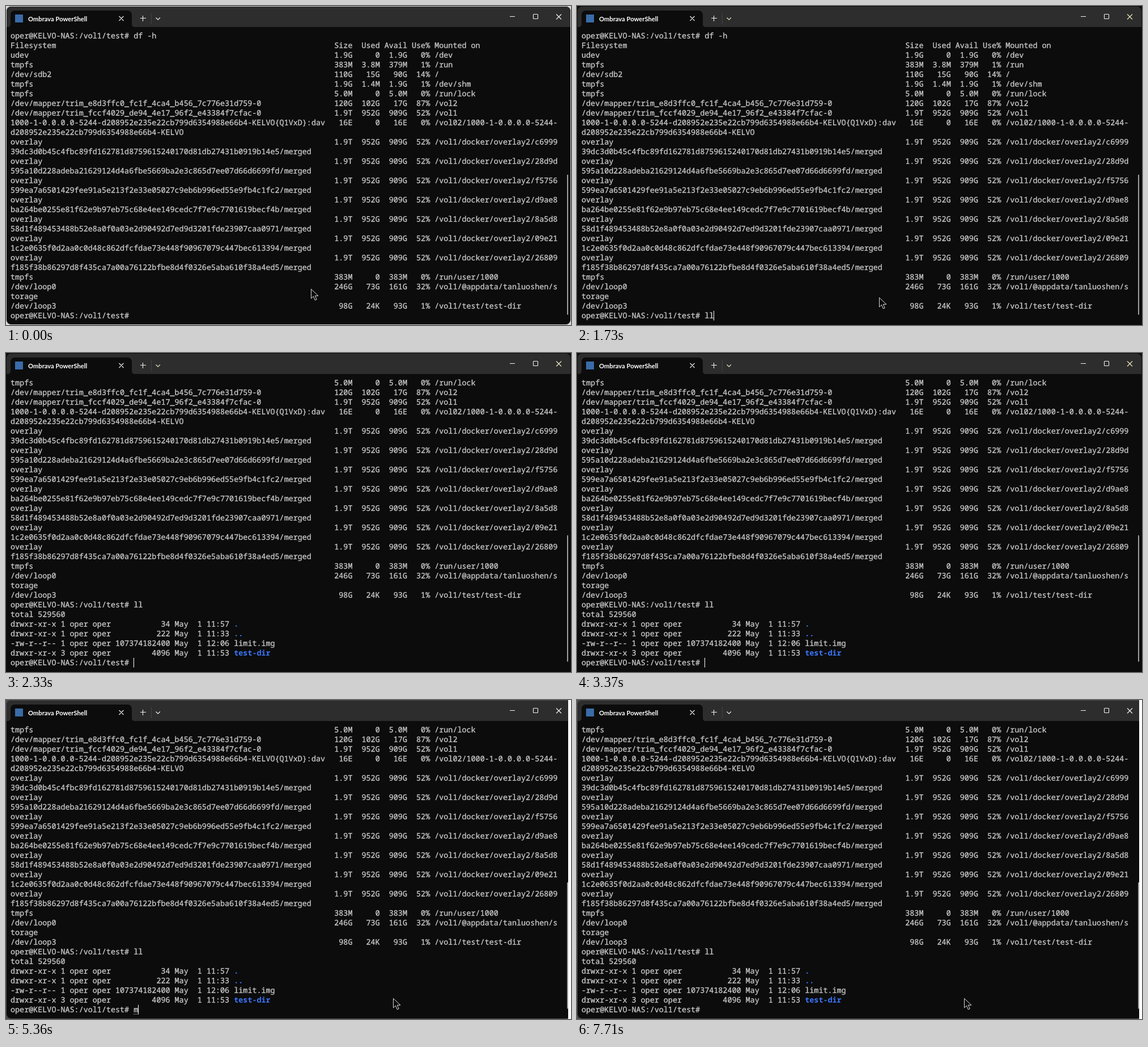
These frames come from a looping animation (997 by 562 pixels, 8000 ms). An HTML page:

```html
<!DOCTYPE html>
<html lang="en">
<head>
<meta charset="utf-8">
<title>Terminal</title>
<style>
html, body { margin: 0; width: 100%; height: 100%; overflow: hidden; background: #0c0c0c; }
svg { display: block; }
.row, .typed { font: 500 13.41px "Noto Sans Mono", "DejaVu Sans Mono", monospace; fill: #ccc; stroke: #ccc; stroke-width: .3; white-space: pre; text-rendering: geometricPrecision; }
.row .dir { fill: #3b78ff; stroke: none; font-weight: 700; }
.tab-title { font: 700 11.2px Lato, "Open Sans", sans-serif; fill: #fff; }
.icons { fill: none; stroke: #f2f2f2; stroke-width: 1.1; }

.anim, .anim * { animation: 8s step-end infinite; }
#backdrop { animation-name: backdrop; }
#tinted { animation-name: tint; }
#strip { animation-name: strip; }
#lines { animation-name: scroll; }
#output { animation-name: output; }
#l1 { animation-name: l1; }
#l2 { animation-name: l2; }
#m { animation-name: m; }
#o { animation-name: o; }
#ime { animation-name: ime; }
#caret { animation-name: caret; }
#thumb { animation-name: thumb; }
#thumb2 { animation-name: thumb2; }
#pointer { animation-name: pointer; }

@keyframes backdrop { 0% { fill: #d8d8d8; } 4.125% { fill: #0c0c0c; } 51.375%, 100% { fill: #4a4a4a; } }
@keyframes tint { 0% { stroke: #f2f2f2; } 4.125% { stroke: #efe8c0; } 52.125%, 100% { stroke: #f2f2f2; } }
@keyframes strip { 0% { opacity: 0; } 51.375%, 100% { opacity: 1; } }
@keyframes scroll {
  0% { transform: translateY(0); }
  27.375% { transform: translateY(-17px); }
  28.25%, 100% { transform: translateY(-102px); }
}
@keyframes output { 0% { opacity: 0; } 28.25%, 100% { opacity: 1; } }
@keyframes l1 { 0% { opacity: 0; } 20%, 100% { opacity: 1; } }
@keyframes l2 { 0% { opacity: 0; } 21.625%, 100% { opacity: 1; } }
@keyframes m { 0% { opacity: 0; } 67% { opacity: 1; } 84.625%, 100% { opacity: 0; } }
@keyframes o { 0% { opacity: 0; } 70.375% { opacity: 1; } 83%, 100% { opacity: 0; } }
@keyframes ime { 0% { opacity: 0; } 68.625% { opacity: 1; } 85.375%, 100% { opacity: 0; } }
@keyframes thumb { 0% { opacity: 1; } 29.125%, 100% { opacity: 0; } }
@keyframes thumb2 { 0% { opacity: 0; } 29.125%, 100% { opacity: 1; } }
@keyframes caret {
  0% { opacity: 0; transform: translateX(225px); }
  4.125% { opacity: 1; transform: translateX(225px); }
  10.875% { opacity: 0; transform: translateX(225px); }
  17.5% { opacity: 1; transform: translateX(225px); }
  20% { opacity: 1; transform: translateX(233px); }
  21.625% { opacity: 1; transform: translateX(241px); }
  27.375% { opacity: 1; transform: translateX(8px); }
  28.25% { opacity: 1; transform: translateX(225px); }
  35.75% { opacity: 0; transform: translateX(225px); }
  42.125% { opacity: 1; transform: translateX(225px); }
  49.625% { opacity: 0; transform: translateX(225px); }
  53.875% { opacity: 1; transform: translateX(225px); }
  60.375% { opacity: 0; transform: translateX(225px); }
  67% { opacity: 1; transform: translateX(233px); }
  70.375% { opacity: 1; transform: translateX(241px); }
  78% { opacity: 0; transform: translateX(241px); }
  83% { opacity: 1; transform: translateX(233px); }
  84.625% { opacity: 1; transform: translateX(225px); }
  96.375%, 100% { opacity: 0; transform: translateX(225px); }
}
@keyframes pointer {
  0% { opacity: 1; transform: translate(538px, 498px); }
  .875% { opacity: 1; transform: translate(535px, 497px); }
  7.5% { opacity: 1; transform: translate(533px, 513px); }
  27.375% { opacity: 0; transform: translate(533px, 513px); }
  49.625% { opacity: 1; transform: translate(684px, 525px); }
  56.25%, 100% { opacity: 1; transform: translate(683px, 525px); }
}
</style>
</head>
<body>
<svg class="anim" width="997" height="562" viewBox="0 0 997 562">
  <rect id="backdrop" width="997" height="562" fill="#d8d8d8"/>

  <!-- window frame -->
  <rect x="1" y="1" width="995" height="560" rx="8" fill="#0c0c0c"/>
  <path d="M1 37V9a8 8 0 0 1 8-8h979a8 8 0 0 1 8 8V37z" fill="#2d2d2d"/>
  <path d="M3 37q5 0 5-5V15a7 7 0 0 1 7-7H215a7 7 0 0 1 7 7V32q0 5 5 5z" fill="#0c0c0c"/>
  <rect x="16" y="15" width="14" height="14" fill="#3a6ca8"/>
  <text class="tab-title" x="39" y="27">Ombrava PowerShell</text>
  <path d="M256.5 12V32" stroke="#434343"/>
  <g class="icons">
    <path d="M199.5 18l8 8m0-8l-8 8M237 21.5h10M241.5 17v10M889 18.5h9"/>
    <rect x="930.5" y="14.5" width="8" height="8" rx="1"/>
    <path id="tinted" d="M264.5 20.5l3.700 3.700l3.700-3.700M971 14.500l9 9m0-9l-9 9"/>
  </g>

  <!-- terminal text -->
  <svg x="0" y="44" width="997" height="511" overflow="hidden">
    <g id="lines">
      <g id="listing"></g>
      <text class="typed" id="l1" x="225.2" y="506">l</text>
      <text class="typed" id="l2" x="233.3" y="506">l</text>
      <g id="output" class="row"></g>
    </g>
  </svg>
  <g id="m">
    <text class="typed" x="225.2" y="550">m</text>
    <path d="M225 553.5h8" stroke="#ccc" stroke-dasharray="1 1"/>
  </g>
  <g id="o">
    <text class="typed" x="233.3" y="550">o</text>
    <path d="M233 553.5h8" stroke="#ccc" stroke-dasharray="1 1"/>
  </g>
  <rect id="caret" y="537" width="1" height="17" fill="#fff"/>

  <rect id="thumb" x="990" y="297" width="2" height="247" rx="1" fill="#9f9f9f"/>
  <rect id="thumb2" x="990" y="321" width="2" height="223" rx="1" fill="#9f9f9f"/>
  <rect id="strip" x="992" width="5" height="562" fill="#fff"/>

  <!-- input method bar -->
  <g id="ime">
    <path d="M226 562v-2a6 6 0 0 1 6-6H736a6 6 0 0 1 6 6v2z" fill="#fafafa"/>
    <path d="M231 562q0-3 3-3h48q3 0 3 3z" fill="#ececec"/>
    <path d="M643.5 559v3M690.5 559v3M715.5 559v3" stroke="#e6e6e6"/>
  </g>

  <path id="pointer" d="M.5 .8V17.200L4.400 13.500L7.300 20.200L10.200 19L7.400 12.600H13z" fill="#0c0c0c" stroke="#fff" stroke-width=".85"/>
</svg>

<script>
const CELL = 8.046, LINE = 17;
const USER = 'oper', HOST = 'KELVO';
const PROMPT = `${USER}@${HOST}-NAS:/vol1/test# `;
const listing = document.getElementById('listing');
const output = document.getElementById('output');
let row = 0;

function put(parent, col, text, cls = 'row') {
  const el = document.createElementNS('http://www.w3.org/2000/svg', 'text');
  el.setAttribute('x', 8 + col * CELL);
  el.setAttribute('y', row * LINE + 13);
  el.setAttribute('class', cls);
  el.textContent = text;
  parent.append(el);
}

function line(parent, text) {
  put(parent, 0, text);
  row++;
}

// File system name, then right-aligned figures and the mount point
function disk(name, figures, mount) {
  const [size, used, avail, use] = figures.split(' ');
  put(listing, 69, size.padStart(6) + used.padStart(6) + avail.padStart(6) + use.padStart(5) + ' ' + mount);
  line(listing, name);
}

function entry(mode, links, size, time, name, cls) {
  put(output, 49, name, cls);
  line(output, `${mode} ${links} ${USER} ${USER} ${size.padStart(12)} May  1 ${time}`);
}

line(listing, PROMPT + 'df -h');
disk('Filesystem', 'Size Used Avail Use%', 'Mounted on');
disk('udev', '1.9G 0 1.9G 0%', '/dev');
disk('tmpfs', '383M 3.8M 379M 1%', '/run');
disk('/dev/sdb2', '110G 15G 90G 14%', '/');
disk('tmpfs', '1.9G 1.4M 1.9G 1%', '/dev/shm');
disk('tmpfs', '5.0M 0 5.0M 0%', '/run/lock');
disk('/dev/mapper/trim_e8d3ffc0_fc1f_4ca4_b456_7c776e31d759-0', '120G 102G 17G 87%', '/vol2');
disk('/dev/mapper/trim_fccf4029_de94_4e17_96f2_e43384f7cfac-0', '1.9T 952G 909G 52%', '/vol1');
disk(`1000-1-0.0.0.0-5244-d208952e235e22cb799d6354988e66b4-${HOST}{Q1VxD}:dav`, '16E 0 16E 0%', '/vol02/1000-1-0.0.0.0-5244-');
line(listing, `d208952e235e22cb799d6354988e66b4-${HOST}`);
[
  ['c6999', '39dc3d0b45c4fbc89fd162781d8759615240170d81db27431b0919b14e5'],
  ['28d9d', '595a10d228adeba21629124d4a6fbe5669ba2e3c865d7ee07d66d6699fd'],
  ['f5756', '599ea7a6501429fee91a5e213f2e33e05027c9eb6b996ed55e9fb4c1fc2'],
  ['d9ae8', 'ba264be0255e81f62e9b97eb75c68e4ee149cedc7f7e9c7701619becf4b'],
  ['8a5d8', '58d1f489453488b52e8a0f0a03e2d90492d7ed9d3201fde23907caa0971'],
  ['09e21', '1c2e0635f0d2aa0c0d48c862dfcfdae73e448f90967079c447bec613394'],
  ['26809', 'f185f38b86297d8f435ca7a00a76122bfbe8d4f0326e5aba610f38a4ed5']
].forEach(([head, rest]) => {
  disk('overlay', '1.9T 952G 909G 52%', '/vol1/docker/overlay2/' + head);
  line(listing, rest + '/merged');
});
disk('tmpfs', '383M 0 383M 0%', '/run/user/1000');
disk('/dev/loop0', '246G 73G 161G 32%', '/vol1/@appdata/tanluoshen/s');
line(listing, 'torage');
disk('/dev/loop3', '98G 24K 93G 1%', '/vol1/test/test-dir');
line(listing, PROMPT);

line(output, 'total 529560');
entry('drwxr-xr-x', 1, '34', '11:57', '.', 'dir');
entry('drwxr-xr-x', 1, '222', '11:33', '..', 'dir');
entry('-rw-r--r--', 1, '107374182400', '12:06', 'limit.img');
entry('drwxr-xr-x', 3, '4096', '11:53', 'test-dir', 'dir');
line(output, PROMPT);
</script>
</body>
</html>
```
